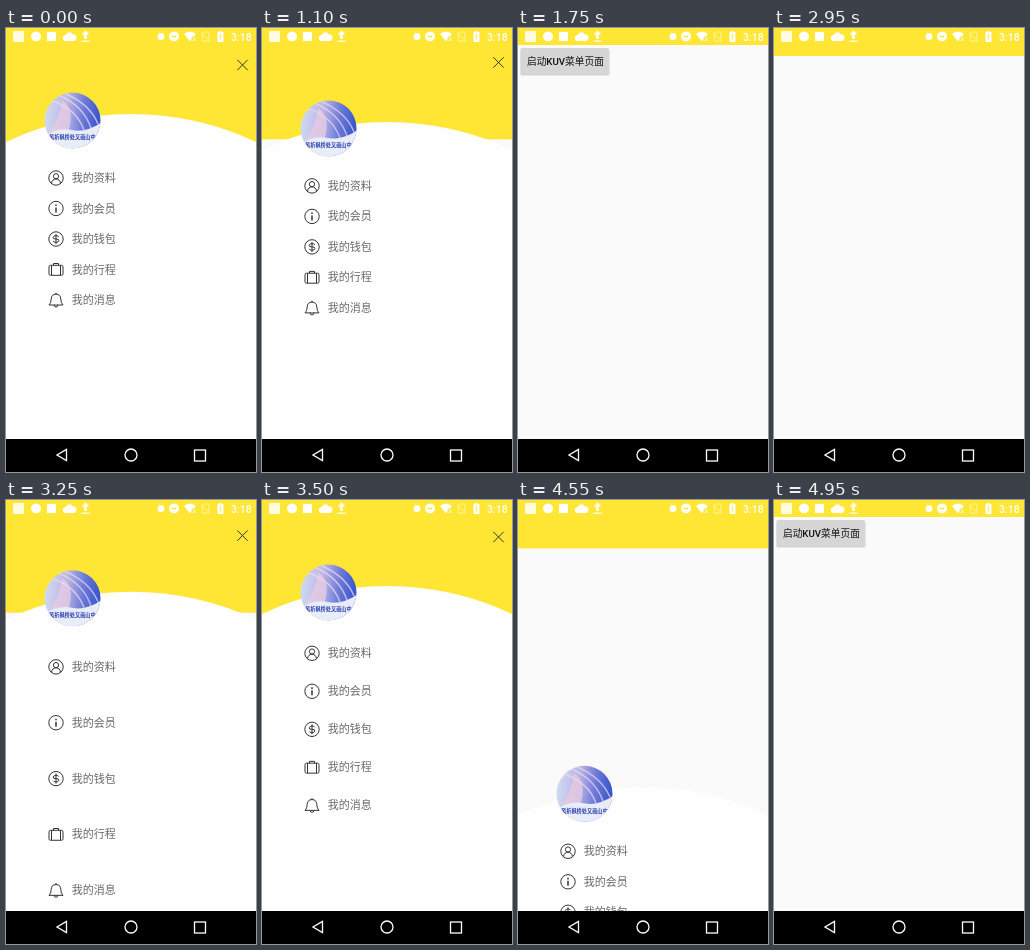
An HTML page for the animation above (5000 ms loop, 250x444 px).

```html
<!DOCTYPE html>
<html lang="zh-CN">
<head>
<meta charset="utf-8">
<style>
  html, body { margin: 0; width: 100%; height: 100%; overflow: hidden; background: #fafafa; }
  svg { display: block; width: 100vw; height: 100vh; }
  text { font-family: Roboto, "Noto Sans CJK SC", "Noto Sans CJK", sans-serif; }
  .line { fill: none; stroke: #333; stroke-width: 1; }
  .white { fill: none; stroke: #fff; stroke-width: 1.3; }
</style>
</head>
<body>
<svg viewBox="0 0 250 444">
  <defs>
    <linearGradient id="sky" x1="0" y1="0.3" x2="1" y2="0.4">
      <stop offset="0" stop-color="#d3dcf3"/>
      <stop offset="0.4" stop-color="#b9b5e4"/>
      <stop offset="0.7" stop-color="#6a79d8"/>
      <stop offset="1" stop-color="#3553cc"/>
    </linearGradient>
    <clipPath id="round"><circle cx="66.5" cy="92.5" r="28"/></clipPath>
  </defs>
  <rect width="250" height="444" fill="#fafafa"/>

  <g id="button">
    <rect x="2.5" y="21" width="89" height="26.5" rx="1.5" fill="#000" opacity=".16"/>
    <rect id="face" x="2.5" y="20" width="88.5" height="26" rx="1.5" fill="#d6d6d6"/>
    <text x="9" y="37.3" font-size="9.7" font-weight="500" fill="#111">启动KUV菜单页面</text>
  </g>

  <g id="header">
    <rect y="-20" width="250" height="134" fill="#ffe534"/>
    <path class="line" d="M231.3 31.8l10.4 10.4m0-10.4l-10.4 10.4"/>
  </g>

  <g id="content">
    <path d="M0 114A293 293 0 0 1 250 114V900H0z" fill="#fefefe"/>
    <g clip-path="url(#round)">
      <rect x="38" y="64" width="57" height="57" fill="url(#sky)"/>
      <path d="M56 72Q70 82 62 104H44Q54 90 56 72z" fill="#e6cbe4" opacity=".8"/>
      <path d="M38 108Q52 99 66 102T96 94V122H38z" fill="#e9edf8"/>
      <path d="M50 66Q80 78 86 104M58 65Q84 76 92 96M44 72Q70 80 78 102" fill="none" stroke="#f3dcee" stroke-width="1.4" opacity=".7"/>
      <text x="43" y="111.3" font-size="5.2" font-weight="700" fill="#2b3fae">风折枫桥处又画山中</text>
    </g>
    <g id="items"></g>
  </g>

  <rect width="250" height="17" fill="#ffe534"/>
  <g fill="#fff">
    <rect x="7" y="3" width="11" height="11" opacity=".85"/>
    <circle cx="30" cy="8.5" r="5"/>
    <rect x="41" y="4" width="9" height="9"/>
    <path d="M60 13a3 3 0 0 1-.3-6a4 4 0 0 1 7.3-.6a3.3 3.3 0 0 1 .4 6.6z"/>
    <path d="M79.5 2.5l4 4h-2.700v4.500h-2.600v-4.500h-2.700zM75.500 12.500h8v1.200h-8z"/>
    <circle cx="155" cy="8.5" r="3.5"/>
    <path fill-rule="evenodd" d="M163 8.500a5 5 0 1 0 10 0a5 5 0 1 0-10 0zM165.500 7.700h5v1.600h-5z"/>
    <path d="M178 6q6-5 12 0l-2.300 2.700h-2.200v2.800l-1.500 2z"/>
    <path d="M187 10l3 3m0-3l-3 3" stroke="#fff"/>
    <path class="white" d="M196.500 13V6l2-2h4.500v9zM195 4l9 9.500" style="stroke-width:.9" opacity=".55"/>
    <path fill-rule="evenodd" d="M213.300 3h2.400v1h1.800v10h-6v-10h1.800zM214 6h1v4h-1zm0 5h1v1h-1z"/>
    <text x="225" y="12.500" font-size="10.500" font-weight="500">3:18</text>
  </g>

  <rect y="411" width="250" height="33"/>
  <path class="white" d="M60.500 421.500v11l-9.500-5.500z"/>
  <circle class="white" cx="125" cy="427" r="6"/>
  <rect class="white" x="188.500" y="422" width="11" height="11"/>
</svg>
<script>
const $ = id => document.getElementById(id);
const ring = '<circle r="7.2"/>';
// Icons are drawn around their own centre.
const menu = [
  ['我的资料', ring + '<circle cy="-1.8" r="2.6"/><path d="M-4.500 5.500Q-4 1 0 1T4.500 5.500"/>'],
  ['我的会员', ring + '<path d="M0-4v1.600M0-1V4" stroke-width="1.5"/>'],
  ['我的钱包', ring + '<path d="M2.800-2Q2.300-3.300 0-3.300T-2.800-1.600T0 0T2.800 1.700T0 3.400T-2.800 2M0-5V5"/>'],
  ['我的行程', '<rect x="-7" y="-4.200" width="14" height="10" rx="1.500"/><path d="M-2.500-4.200V-6h5v1.800M-4.500-4.200v10M4.500-4.200v10"/>'],
  ['我的消息', '<path d="M-7 5Q-4.800 3-4.800-1Q-4.500-5.800 0-5.800T4.800-1Q4.800 3 7 5zM0-5.800V-7.300M-2 5Q-1.800 7 0 7T2 5"/>']
];
$('items').innerHTML = menu.map(([label, icon]) =>
  `<g><g class="line">${icon}</g><text x="15.800" y="4" font-size="11" fill="#6a6a6a">${label}</text></g>`).join('');
const rows = [...$('items').children];

const clamp = x => Math.min(1, Math.max(0, x));
const ease = x => 0.5 - Math.cos(Math.PI * clamp(x)) / 2;
const shift = (el, x, y) => el.setAttribute('transform', `translate(${x} ${y})`);

const LOOP = 5000, STEP = 50, PRESS = 2700, OPEN = 2785;

function draw(t) {
  const second = t >= PRESS;
  const hidden = second ? 1 - ease((t - OPEN) / 500) : 0;
  const closed = ease((t - (second ? 4276 : 1052)) / 500);
  const spread = second ? 1 - ease((t - OPEN) / 965) : 0;

  shift($('header'), 0, -114 * Math.min(1, hidden + closed));
  shift($('content'), 0, 480 * hidden + 350 * closed);
  rows.forEach((row, i) => shift(row, 50, 150 + 30.5 * i + (21 + 48 * i) * spread));

  const fadeOut = second ? clamp((2800 - t) / 100) : 1;
  const fadeIn = clamp((t - (t < 4000 ? 1600 : 4800)) / 150);
  $('button').setAttribute('opacity', t < 4000 ? fadeIn * fadeOut : fadeIn);
  $('face').setAttribute('fill', second && t < 4000 ? '#c4c4c4' : '#d6d6d6');
}

const start = performance.now();
function tick() {
  const t = (performance.now() - start) % LOOP;
  draw(Math.floor(t / STEP) * STEP);
  requestAnimationFrame(tick);
}
tick();
</script>
</body>
</html>
```
